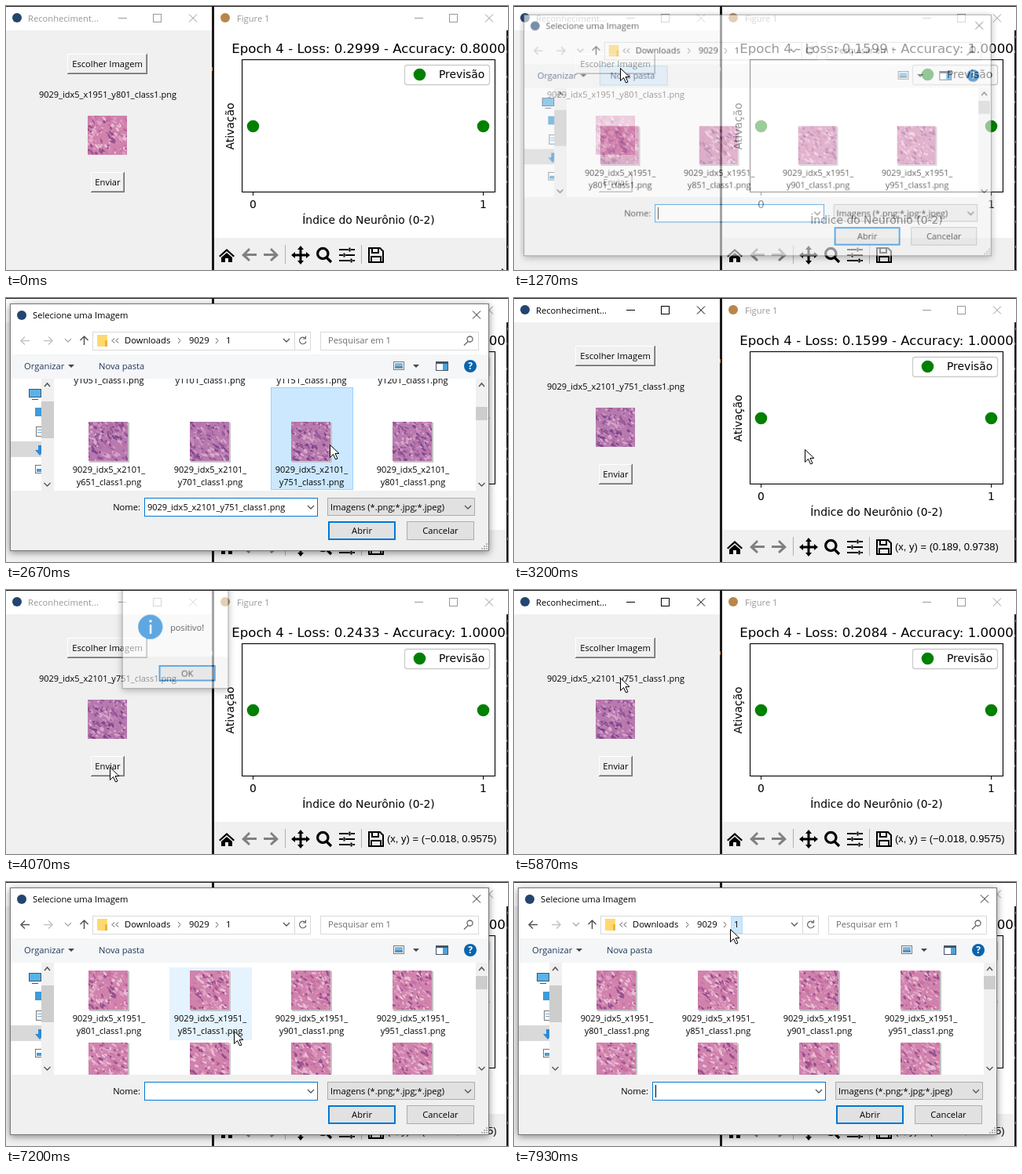
These frames come from a looping animation (639x337 px, 8 s). An HTML page with a canvas:

```html
<!DOCTYPE html>
<html lang="pt">
<head>
<meta charset="utf-8">
<title>Reconhecimento</title>
<style>
html, body { margin: 0; width: 100%; height: 100%; overflow: hidden; background: #1e1e1e; }
canvas { display: block; }
</style>
</head>
<body>
<canvas id="stage" width="639" height="337"></canvas>
<script>
const W = 639, H = 337, LOOP = 8000, FPS = 15;
const UI = '11.2px "Open Sans", "Noto Sans", sans-serif';
const FILE = '11px "Open Sans", "Noto Sans", sans-serif';
const PLOT = '13.89px "DejaVu Sans", sans-serif';
const PLOT_TITLE = '16.6px "DejaVu Sans", sans-serif';
const STATUS = '13px "Liberation Sans", sans-serif';
const BLUE = '#0078d7', PANEL = '#f0f0f0', GREEN = '#008000';

const stage = document.getElementById('stage').getContext('2d');
const layer = Object.assign(document.createElement('canvas'), { width: W, height: H }).getContext('2d');
let g = stage;

// Times of the events in the story
const OPEN1 = 1222, PICK = 2390, CLOSE1 = 2720, MSG = 4022, OK = 5200, OPEN2 = 6388, DENSE = 6700;
const PICKED_ROW = 10, ROW = 130;
const mouse = [
  [70, 631, 335], [870, 135, 79], [1290, 135, 79], [1750, 604, 128], [2070, 604, 147],
  [2130, 604, 147], [2340, 412, 187], [3070, 412, 187], [3600, 132, 226], [4730, 132, 226],
  [5130, 232, 106], [5330, 232, 106], [5860, 135, 112], [6070, 137, 78], [6270, 137, 78],
  [6466, 180, 151], [7200, 290, 190], [7330, 290, 190], [7900, 275, 59]
];
const results = [
  [0, '0.2999', '0.8000'], [470, '0.1599', '1.0000'], [3870, '0.2433', '1.0000'],
  [5330, '0.2084', '1.0000'], [6130, '0.3111', '0.9000']
];

const clamp = p => Math.max(0, Math.min(1, p));
const smooth = p => p * p * (3 - 2 * p);
const inside = (p, x, y, w, h) => p.x >= x && p.x < x + w && p.y >= y && p.y < y + h;
const pop = (t, open, close) => (1 - (1 - clamp((t - open) / 120)) ** 2) * (1 - clamp((t - close) / 120));

function cursorAt(t) {
  const i = mouse.findIndex(k => k[0] > t);
  if (i < 1) { const k = i ? mouse[mouse.length - 1] : mouse[0]; return { x: k[1], y: k[2] }; }
  const [t0, x0, y0] = mouse[i - 1], [t1, x1, y1] = mouse[i];
  const p = smooth((t - t0) / (t1 - t0));
  return { x: Math.round(x0 + (x1 - x0) * p), y: Math.round(y0 + (y1 - y0) * p) };
}

// Drawing helpers
function rect(x, y, w, h, fill, stroke, lw = 1) {
  if (fill) { g.fillStyle = fill; g.fillRect(x, y, w, h); }
  if (stroke) {
    g.strokeStyle = stroke; g.lineWidth = lw;
    g.strokeRect(x + lw / 2, y + lw / 2, w - lw, h - lw);
  }
}
function path(d, fill, stroke, lw = 1) {
  const p = new Path2D(d);
  if (fill) { g.fillStyle = fill; g.fill(p); }
  if (stroke) { g.strokeStyle = stroke; g.lineWidth = lw; g.stroke(p); }
}
function dot(x, y, r, fill) {
  g.beginPath(); g.arc(x, y, r, 0, 7); g.fillStyle = fill; g.fill();
}
function text(s, x, y, align = 'left', color = '#000', font = UI) {
  g.font = font; g.textAlign = align; g.fillStyle = color; g.fillText(s, x, y);
}
const cross = (x, y, r, color) =>
  path(`M${x - r} ${y - r}l${2 * r} ${2 * r}M${x + r} ${y - r}l${-2 * r} ${2 * r}`, null, color);
const chevron = (x, y, color = '#555') => path(`M${x - 4} ${y - 2}l4 4 4-4`, null, color, 1.3);
const chevronUp = (x, y) => path(`M${x - 3.5} ${y + 2}l3.5-4 3.5 4`, null, '#555', 1.5);
const angle = x => path(`M${x - 2} 51l3 3.5-3 3.5`, null, '#666');
const triangle = (x, y) => path(`M${x - 4} ${y - 2}h8l-4 4z`, '#444');

function tissue(x, y, seed, purple) {
  seed = seed * 7919 + 77;
  const rnd = () => (seed = (seed * 16807 + 11) % 2147483647) / 2147483647;
  const tones = purple
    ? ['#c98dba', '#b46fa6', '#d9a9cc', '#7d478c', '#94599c']
    : ['#e0a0c2', '#c8709f', '#e9bfd5', '#96508f', '#d488b0'];
  rnd();
  g.save();
  g.beginPath(); g.rect(x, y, 50, 50); g.clip();
  rect(x, y, 50, 50, purple ? '#b87aae' : '#d082ad');
  for (let i = 0; i < 180; i++) {
    g.beginPath();
    g.ellipse(x + rnd() * 50, y + rnd() * 50, 1 + rnd() * 3, 0.6 + rnd() * 1.2, 0.2 + rnd(), 0, 7);
    g.fillStyle = tones[i % 5];
    g.fill();
  }
  g.restore();
}

function windowBar(x, w, title, active, textX, mark) {
  const c = active ? '#000' : '#999', r = x + w;
  rect(x, 1, w, 30, '#fff');
  dot(x + 14, 15, 6, mark);
  text(title, textX, 20, 'left', c);
  path(`M${r - 119} 15.5h11`, null, c);
  rect(r - 75, 10, 11, 11, null, c);
  cross(r - 24, 15.5, 5, c);
}

function tkButton(label, x, y, w) {
  rect(x, y, w, 26, '#696969');
  rect(x, y, w - 1, 25, '#fff');
  rect(x + 1, y + 1, w - 2, 24, '#a0a0a0');
  rect(x + 1, y + 1, w - 3, 23, PANEL);
  text(label, x + w / 2, y + 17, 'center');
}

function fileName(row, col) {
  const x = 1951 + 50 * Math.floor(row * 0.3);
  const y = (row < 2 ? 801 + 200 * row : 651 + 200 * ((row + 2) % 3)) + 50 * col;
  return [`9029_idx5_x${x}_`, `y${y}_class1.png`];
}

function drawForm(t) {
  const active = (t > 1000 && t < OPEN1) || (t > 2800 && t < 4000) || (t > 5250 && t < OPEN2);
  const row = t < 2750 ? 0 : PICKED_ROW, col = row ? 2 : 0;
  rect(0, 1, 262, H, PANEL);
  windowBar(0, 262, 'Reconheciment...', active, 28, '#23456f');
  tkButton('Escolher Imagem', 78, 61, 102);
  text(fileName(row, col).join(''), 129.5, 117, 'center', '#000', FILE);
  tissue(104, 140, row * 4 + col, row > 0);
  tkButton('Enviar', 108, 212, 43);
}

function statusText(t, p) {
  if (t < 3070) return '';
  let x = -0.018, y = 0.9575;
  if (t < 3600 && p.x > 309) {
    x = (p.x - 314.5) / 293;
    y = 1 + (153 - p.y) * 0.11 / 168;
  }
  return `(x, y) = (${x.toFixed(3).replace('-', '−')}, ${y.toFixed(4)})`;
}

function drawFigure(t, p) {
  const [, loss, acc] = results.filter(r => r[0] <= t).pop();
  rect(265, 1, 372, H, '#fff');
  windowBar(265, 374, 'Figure 1', false, 294, '#b8864b');
  text(`Epoch 4 - Loss: ${loss} - Accuracy: ${acc}`, 461.5, 60, 'center', '#000', PLOT_TITLE);
  for (const [i, x] of [314.5, 607.5].entries()) {
    path(`M${x} 237v5`, null, '#000');
    text(i, x, 258, 'center', '#000', PLOT);
    dot(x, 153.5, 7.8, GREEN);
  }
  rect(300, 68, 323, 170, null, '#000', 1.1);
  text('Índice do Neurônio (0-2)', 461.5, 277.5, 'center', '#000', PLOT);
  g.save();
  g.translate(290, 153.5); g.rotate(-Math.PI / 2);
  text('Ativação', 0, 0, 'center', '#000', PLOT);
  g.restore();
  g.beginPath(); g.roundRect(507.5, 75.5, 108, 25, 3);
  g.strokeStyle = '#ccc'; g.lineWidth = 1.3; g.stroke();
  dot(526.5, 87.5, 7.8, GREEN);
  text('Previsão', 551, 92, 'left', '#000', PLOT);

  // Toolbar
  rect(265, 296, 372, 41, PANEL);
  path('M271 319l10-9 10 9-1.5 1.5L281 313l-8.5 7.5zM274 321l7-6 7 6v6h-5v-5h-4v5h-5z', '#000');
  path('M300 318l9-9 2 2-5 5h13v3h-13l5 5-2 2zM347 318l-9-9-2 2 5 5h-13v3h13l-5 5 2 2z', '#808080');
  path('M355.5 305v24M452.5 305v24', null, '#b0b0b0');
  path('M375 306l4 5h-2.5v5.5h5.5v-2.5l5 4-5 4v-2.5h-5.5v5.5h2.5l-4 5-4-5h2.5v-5.5h-5.5v2.5l-5-4 5-4v2.5h5.5v-5.5h-2.5z', '#000');
  path('M410 316a6.7 6.7 0 1 0-13.4 0a6.7 6.7 0 1 0 13.4 0M408 321l6 6', null, '#000', 3.2);
  path('M424 311h20M424 318h20M424 325h20', null, '#000', 2);
  for (const [x, y] of [[436, 311], [429, 318], [438, 325]]) rect(x, y - 3, 3, 6, '#000', PANEL, 0.5);
  path('M462 309h14l4 4v14h-18zM466 309v6h8v-6M465 327v-7h12v7', null, '#000', 2);
  text(statusText(t, p), 485, 322, 'left', '#000', STATUS);
}

function drawFiles(t, p) {
  const dense = t > DENSE;
  const drag = t < OPEN2 ? smooth(clamp((t - 1750) / 320)) : 0;
  const scroll = drag * (ROW * PICKED_ROW - 5);
  const pitch = dense ? 92 : ROW, top = dense ? 4 : 44;
  g.save();
  g.beginPath(); g.rect(61, 103, 537, 143); g.clip();
  for (let row = 0; row < 13; row++) {
    const y = Math.round(109 + row * pitch - scroll);
    if (y < -30 || y > 246) continue;
    for (let col = 0; col < 4; col++) {
      const x = 79 + col * 129, cx = x + 51;
      const picked = t > PICK && t < OPEN2 && row === PICKED_ROW && col === 2;
      if (picked) rect(x, y, 105, pitch + 1, '#cce8ff', '#99d1ff');
      else if (inside(p, x, y, 106, pitch)) rect(x, y, 105, pitch + 1, '#e5f3ff');
      rect(cx - 24, y + top + 1, 51, 51, '#c4c4c4');
      tissue(cx - 25, y + top, row * 4 + col, row > 8);
      fileName(row, col).forEach((line, i) =>
        text(line, cx + 1, y + top + 65 + i * 16, 'center', '#000', FILE));
    }
  }
  g.restore();
  rect(598, 103, 15, 143, PANEL);
  chevronUp(605.5, 111); chevron(605.5, 238);
  rect(598, 120 + Math.round(drag * 19), 15, 17, '#cdcdcd');
}

function drawDialog(t, p) {
  g.shadowColor = 'rgba(0,0,0,.45)'; g.shadowBlur = 9; g.shadowOffsetY = 2;
  rect(5, 7, 610, 316, '#fff');
  g.shadowColor = 'transparent';
  dot(20, 22, 6, '#23456f');
  text('Selecione uma Imagem', 34, 26);
  cross(599, 21.5, 5, '#222');

  // Address row
  path('M30 54.5h-11m5-5l-5 5 5 5', null, t > DENSE ? '#555' : '#c4c4c4', 1.5);
  path('M48 54.5h11m-5-5l5 5-5 5', null, '#c4c4c4', 1.5);
  chevron(79, 54, '#aaa');
  path('M99.5 60v-11m-5 5l5-5 5 5', null, '#555', 1.5);
  rect(110, 43, 278, 24, '#fff', '#d9d9d9');
  rect(116, 47, 13, 15, '#ffd96f');
  rect(126, 54, 3, 8, '#e8b63e');
  path('M138 51.5l-3 3 3 3M143 51.5l-3 3 3 3', null, '#444');
  text('Downloads', 151, 58);
  angle(221);
  text('9029', 233, 58);
  angle(269);
  if (inside(p, 272, 44, 19, 22)) rect(276, 44, 15, 22, '#cce8ff', '#b5dcf8');
  text('1', 280, 58);
  chevron(357, 54);
  path('M367.5 44v22', null, '#d9d9d9');
  path('M381 51.5a4.3 4.3 0 1 0 1 4M381.5 48.5v3.5h-3.5', null, '#666', 1.2);
  rect(400, 43, 202, 24, '#fff', '#d9d9d9');
  text('Pesquisar em 1', 410, 58, 'left', '#6d6d6d');
  path('M594 52.5a3.5 3.5 0 1 0-7 0a3.5 3.5 0 1 0 7 0M588 55.5l-5 5', null, '#666', 1.3);

  // Command row
  rect(5, 72, 610, 31, '#f5f6f7');
  if (inside(p, 105, 74, 88, 28)) rect(104, 74, 89, 26, '#d9ebf9', '#a8d3f2');
  text('Organizar', 23, 91, 'left', '#1e395b');
  triangle(83, 87);
  text('Nova pasta', 118, 91, 'left', '#1e395b');
  rect(493, 81, 14, 11, '#fff', '#777');
  rect(495, 83, 10, 4, '#79b8e8'); rect(495, 87, 10, 3, '#5f8fb0');
  triangle(522, 87);
  rect(547, 81, 16, 12, '#fff', '#456');
  rect(547, 81, 16, 3, '#456'); rect(556, 84, 6, 8, '#4aa3df');
  dot(591, 87, 8, '#0a64ad');
  text('?', 591, 91, 'center', '#fff', 'bold 12px "Open Sans", sans-serif');

  // Folder tree
  rect(5, 183, 40, 20, '#d9d9d9');
  rect(29, 116, 16, 11, '#58b4e8', '#457'); rect(33, 129, 8, 1, '#457');
  rect(37, 140, 9, 11, '#3f9bd8');
  rect(38, 164, 8, 13, '#fff', '#777'); path('M40 168.5h5M40 171.5h5', null, '#6aa7d8');
  path('M41 188h4v6h4l-6 7-6-7h4z', '#2b8bd8');
  rect(37, 213, 13, 11, '#fff', '#777'); rect(39, 218, 8, 4, '#4b9bd0');
  rect(45, 103, 16, 143, PANEL);
  chevronUp(52.5, 111); chevron(52.5, 238);
  rect(45, 132, 16, 47, '#cdcdcd');
  drawFiles(t, p);

  // Footer
  rect(5, 246, 610, 77, PANEL);
  text('Nome:', 171, 271, 'right');
  rect(176, 255, 221, 24, '#fff', BLUE);
  const since = t - (t < OPEN2 ? OPEN1 : OPEN2);
  if (t > PICK && t < OPEN2) text(fileName(PICKED_ROW, 2).join(''), 180, 271, 'left', '#000', FILE);
  else if (Math.floor(since / 500) % 2 === 0) rect(180, 259, 1, 16, '#000');
  chevron(388, 267);
  rect(409, 255, 188, 23, '#e1e1e1', '#adadad');
  text('Imagens (*.png;*.jpg;*.jpeg)', 413, 271);
  chevron(588, 267);
  rect(410, 285, 86, 24, '#e1e1e1', BLUE, 2);
  text('Abrir', 453, 301, 'center');
  rect(510, 285, 86, 24, '#e1e1e1', '#adadad');
  text('Cancelar', 553, 301, 'center');
  for (let i = 0; i < 3; i++)
    for (let j = 0; j <= i; j++) rect(611 - j * 3, 313 + i * 3, 2, 2, '#b5b5b5');
  rect(5, 7, 610, 316, null, '#777');
}

function drawMessage() {
  g.shadowColor = 'rgba(0,0,0,.45)'; g.shadowBlur = 9; g.shadowOffsetY = 2;
  rect(146, -27, 139, 155, '#fff');
  g.shadowColor = 'transparent';
  rect(146, 86, 139, 42, PANEL);
  dot(183, 47, 16, BLUE);
  rect(182, 44, 2.5, 12, '#fff'); dot(183.2, 39.5, 1.8, '#fff');
  text('positivo!', 209, 52);
  rect(194, 97, 74, 21, '#e1e1e1', BLUE, 2);
  text('OK', 231, 112, 'center');
  rect(146, -27, 139, 155, null, '#777');
}

// Draws a window on its own layer, then fades and grows it into place
function popup(alpha, cx, cy, draw) {
  if (alpha <= 0) return;
  g = layer;
  g.clearRect(0, 0, W, H);
  draw();
  g = stage;
  const s = 1 - 0.06 * (1 - alpha);
  g.save();
  g.globalAlpha = alpha;
  g.translate(cx, cy); g.scale(s, s);
  g.drawImage(layer.canvas, -cx, -cy);
  g.restore();
}

function draw(t) {
  const p = cursorAt(t);
  rect(0, 0, W, H, '#1a1a1a');
  for (let i = 0; i < 14; i++) rect(637 + i % 2, 25 + (i * 83) % 300, 1, 3, '#777');
  rect(262, 78, 1, 5, '#c08040');
  drawForm(t);
  drawFigure(t, p);
  const second = t >= OPEN2;
  popup(pop(t, second ? OPEN2 : OPEN1, second ? Infinity : CLOSE1), 309, 165, () => drawDialog(t, p));
  popup(pop(t, MSG, OK), 215.5, 50, drawMessage);
  g.save();
  g.translate(p.x + 0.5, p.y + 0.5);
  path('M0 0v16l4-4 3 6.5 2.5-1-3-6.5h5z', '#fff', '#000');
  g.restore();
}

function tick() {
  const t = performance.now() % LOOP;
  draw(Math.floor(t * FPS / 1000) * 1000 / FPS);
  requestAnimationFrame(tick);
}
tick();
</script>
</body>
</html>
```
